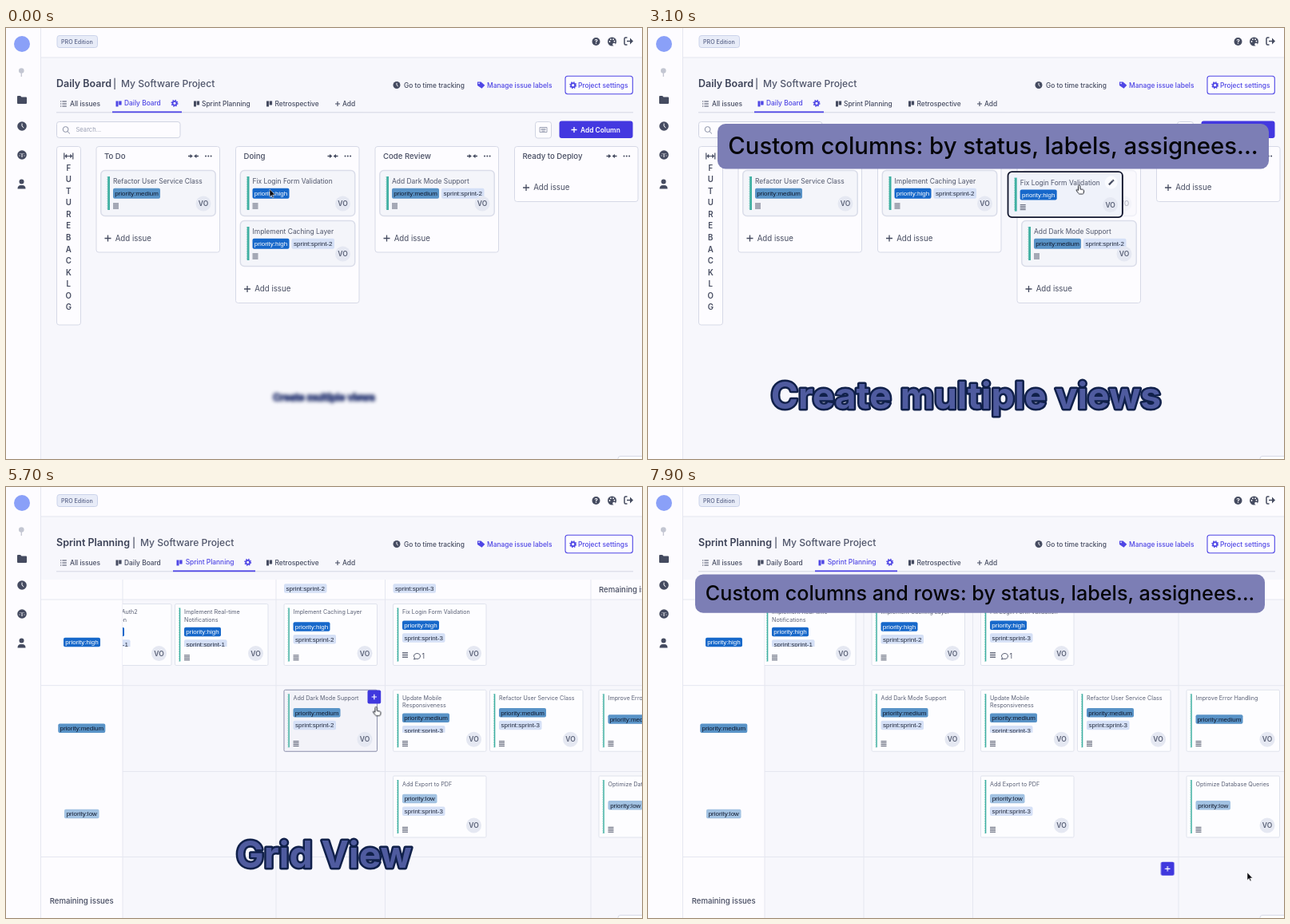
Recreate the animation shown at these times as an HTML page. Size 796 px wide and 540 px high, loop 8 s.

```html
<!DOCTYPE html>
<html lang="en">
<head>
<meta charset="utf-8">
<title>Project board</title>
<style>
html, body { margin: 0; width: 100%; height: 100%; overflow: hidden; background: #f7f7fc; }
svg { font-family: Inter, sans-serif; font-optical-sizing: none; }
#stage { display: block; width: 796px; height: 540px; }
.tag { font-family: "Liberation Sans", Arial, sans-serif; }
.ico { fill: none; stroke: #454b60; }
.step { animation: 8s step-end infinite; }
.move { animation: 8s linear infinite; }

.board { animation-name: board; }
.grid-page { animation-name: grid-page; }
.before { animation-name: before; }
.after { animation-name: after; }
.lifted { animation-name: lifted; }
.landing { animation-name: landing; }
.hovered { animation-name: hovered; }
.hand { animation-name: hand; }
.arrow { animation-name: arrow; }
.cell-hover { animation-name: cell-hover; }
.last-plus { animation-name: last-plus; }
.drag { animation-name: drag; }
.cursor { animation-name: cursor; }
.scroll { animation-name: scroll; animation-timing-function: ease-in-out; }
.cap { transform-origin: 398px 463px; }
.cap1 { animation-name: cap1; }
.cap2 { animation-name: cap2; }
.ban1 { animation-name: ban1; }
.ban2 { animation-name: ban2; }

@keyframes board { 0% { opacity: 1 } 58.75%, 100% { opacity: 0 } }
@keyframes grid-page { 0% { opacity: 0 } 58.75%, 100% { opacity: 1 } }
@keyframes before { 0% { opacity: 1 } 36.25%, 100% { opacity: 0 } }
@keyframes after { 0% { opacity: 0 } 36.25%, 100% { opacity: 1 } }
@keyframes lifted { 0% { opacity: 1 } 25%, 100% { opacity: .4 } }
@keyframes landing { 0% { opacity: .4 } 41.25%, 100% { opacity: 1 } }
@keyframes hovered { 0% { opacity: 0 } 3.5% { opacity: 1 } 51%, 100% { opacity: 0 } }
@keyframes hand { 0% { opacity: 0 } 3.1% { opacity: 1 } 73.75%, 100% { opacity: 0 } }
@keyframes arrow { 0% { opacity: 1 } 3.1% { opacity: 0 } 73.75%, 100% { opacity: 1 } }
@keyframes cell-hover { 0% { opacity: 0 } 67.5% { opacity: 1 } 73.75%, 100% { opacity: 0 } }
@keyframes last-plus { 0% { opacity: 0 } 86.25%, 100% { opacity: 1 } }
@keyframes drag {
  0%, 25% { transform: translate(293px, 178px) }
  30% { transform: translate(318.5px, 170px) }
  36% { transform: translate(430px, 178px) }
  41.2% { transform: translate(468px, 181px) }
  41.25%, 100% { transform: translate(467.5px, 178px) }
}
@keyframes cursor {
  0% { transform: translate(333px, 207px) }
  17.5% { transform: translate(372px, 205px) }
  25% { transform: translate(384px, 201px) }
  30% { transform: translate(410px, 193px) }
  36% { transform: translate(521px, 201px) }
  41.25% { transform: translate(559px, 204px) }
  48.75% { transform: translate(491px, 233px) }
  56.25%, 62.5% { transform: translate(270px, 95px) }
  71.25% { transform: translate(464px, 281px) }
  80%, 100% { transform: translate(753px, 488px) }
}
@keyframes scroll {
  0%, 63% { transform: translate(0, 0) }
  71.25% { transform: translate(-65.5px, 0) }
  85%, 87% { transform: translate(-8px, 0) }
  98.75%, 100% { transform: translate(-133.5px, 0) }
}
@keyframes cap1 {
  0% { transform: scale(.26); filter: blur(9px); opacity: 1; animation-timing-function: ease-out }
  9%, 39% { transform: scale(1); filter: blur(0); opacity: 1; animation-timing-function: ease-in }
  45%, 100% { transform: scale(.2); filter: blur(10px); opacity: 0 }
}
@keyframes cap2 {
  0%, 60.5% { transform: scale(.2); filter: blur(10px); opacity: 0; animation-timing-function: ease-out }
  69.5%, 90.5% { transform: scale(1); filter: blur(0); opacity: 1; animation-timing-function: ease-in }
  96.5%, 100% { transform: scale(.2); filter: blur(10px); opacity: 0 }
}
@keyframes ban1 { 0%, 23.75% { opacity: 0 } 27.5%, 55% { opacity: 1 } 57.5%, 100% { opacity: 0 } }
@keyframes ban2 { 0%, 77.5% { opacity: 0 } 81.25%, 100% { opacity: 1 } }
</style>
</head>
<body>
<svg id="stage" viewBox="0 0 796 540"></svg>
<script>
const INK = '#454b60', BLUE = '#4f46e5', PAPER = '#fdfcff', BACK = '#f7f7fc', EDGE = '#d6d9e6', RULE = '#e5e7f0';

const text = (x, y, size, str, fill = INK, weight = 400, extra = '') =>
  `<text x="${x}" y="${y}" font-size="${size}" fill="${fill}" font-weight="${weight}" ${extra}>${str}</text>`;
const mid = 'text-anchor="middle"';
const box = (x, y, w, h, r, fill, stroke = 'none', sw = 1) =>
  `<rect x="${x}" y="${y}" width="${w}" height="${h}" rx="${r}" fill="${fill}" stroke="${stroke}" stroke-width="${sw}"/>`;
const dot = (x, y, r, fill) => `<circle cx="${x}" cy="${y}" r="${r}" fill="${fill}"/>`;
const at = (x, y, body) => `<g transform="translate(${x} ${y})">${body}</g>`;
const group = (cls, body) => `<g class="${cls}">${body}</g>`;
const line = (x, y, d, sw = 1, color = INK, extra = '') =>
  at(x, y, `<path d="${d}" class="ico" style="stroke:${color}" stroke-width="${sw}" ${extra}/>`);
const solid = (x, y, d, fill = INK) => at(x, y, `<path d="${d}" fill="${fill}"/>`);

// Icons
const plus = (x, y, r = 4, color = INK, sw = 1.3) => line(x, y, `M${-r} 0h${2 * r}M0 ${-r}v${2 * r}`, sw, color);
const notes = (x, y) => line(x, y, 'M-3.5-3h7M-3.5-1h7M-3.5 1h7M-3.5 3h7', .9);
const bars = (x, y, color) => solid(x, y, 'M-3.5-3.5h3v7h-2.4q-.6 0-.6-.6zM.2-3.5h3.4v4.4q0 .6-.6.6H.2z', color);
const gear = (x, y) => at(x, y, `<circle r="2.5" fill="none" stroke="${BLUE}" stroke-width="1.8"/>
  <circle r="3.8" fill="none" stroke="${BLUE}" stroke-width="1.4" stroke-dasharray="1.5 1.485"/>`);
const clock = (x, y, r) => dot(x, y, r, INK) + line(x, y, `M0 ${-r * .6}V0l${r * .4} ${r * .35}`, 1, PAPER);
const collapse = (x, y) => line(x, y, 'M-6.5 0h4M6.5 0h-4', 1.3) + solid(x, y, 'M-4-2.6l3.4 2.6-3.4 2.6zM4-2.6L.6 0 4 2.6z');
const dots = (x, y) => [-3.3, 0, 3.3].map(d => dot(x + d, y, 1, INK)).join('');
const avatar = (x, y) => dot(x, y, 9.5, '#e5e8f2') + text(x, y + 3.1, 8.5, 'VO', '#5a6177', 600, mid);

const TAGS = {
  high: ['priority:high', 46, '#1768ca', '#fff'],
  medium: ['priority:medium', 59, '#5993c7', '#10182c'],
  low: ['priority:low', 43.5, '#a2c2e2', '#10182c'],
  s1: ['sprint:sprint-1', 53.5, '#d5e0f6', '#20283c'],
  s2: ['sprint:sprint-2', 53.5, '#d5e0f6', '#20283c'],
  s3: ['sprint:sprint-3', 53.5, '#d5e0f6', '#20283c'],
};
function tag(x, cy, key, h = 11.5) {
  const [name, w, bg, fg] = TAGS[key];
  return box(x, cy - h / 2, w, h, 2, bg) + text(x + w / 2, cy + 2.8, 8, name, fg, 400, `class="tag" ${mid}`);
}
const stripe = (x, y, w, h) =>
  box(x, y, w, h, 0, '#3fb0a2') + line(x - .3, y, `M0 0v${h}`, .8, '#8fd0c6', 'stroke-dasharray="1.5 1.5"');

function chrome() {
  const side = box(0, 0, 43.5, 540, 0, PAPER) + box(43.5, 0, 753, 36.5, 0, PAPER) +
    line(43.5, 0, 'M0 0V540M0 37H753', 1, RULE) +
    dot(20, 20, 10, '#8aa0f8') +
    dot(19.3, 53.5, 3.3, '#c3c6d2') + line(19.3, 55, 'M0 0v6', 1.3, '#c3c6d2') +
    solid(20, 90, 'M-6-4q0-1 1-1h3l1.5 1.5H5q1 0 1 1V4q0 1-1 1H-5q-1 0-1-1z') +
    clock(20, 123, 5.8) +
    dot(20, 159, 5.8, INK) + line(20, 160, 'M0 2V-3M-3.5 0h1M2.5 0h1M-2.6-3l.8.8M2.6-3l-.8.8', 1, PAPER) +
    dot(19.5, 192.5, 3, INK) + solid(19.5, 196, 'M-5 5.5q0-4.5 4-4.5h2q4 0 4 4.5z');
  const top = box(64, 9.5, 50.5, 15, 3, '#e8ecf8', '#cbd3ea') + text(69, 19.7, 7.1, 'PRO Edition', '#5a6488', 500) +
    dot(738.5, 17, 5, INK) + text(738.5, 19.8, 7.6, '?', PAPER, 700, mid) +
    dot(758.5, 17, 5.5, INK) + [[-3, 0], [-1.6, -2.8], [1.6, -2.8], [3, -.3]].map(([x, y]) => dot(758.5 + x, 17 + y, .9, PAPER)).join('') +
    dot(761, 20.5, 1.8, PAPER) +
    line(779, 16.5, 'M-1.5-4.5h-2q-1.5 0-1.5 1.5v6q0 1.5 1.5 1.5h2M-2 0h6', 1.5) + solid(779, 16.5, 'M2-4l4 4-4 4z');
  return side + top + box(766, 536.5, 40, 10, 3, '#fff', EDGE);
}

function header(title, barX, nameX, sprint) {
  const link = (x, y, str, on) => text(x, y, 8.4, str, on ? BLUE : INK, 500);
  const [u0, u1] = sprint ? [209, 312] : [133, 220];
  return text(63, 74.4, 12.5, title, '#3c4257', 600) + text(barX, 74, 12, '|', INK, 500) +
    text(nameX, 74.4, 12.1, 'My Software Project', '#50566b', 500) +
    clock(489, 71.5, 4.5) + link(498, 74.6, 'Go to time tracking') +
    solid(595, 71.5, 'M-5-4h4.5l4.8 4.2-3.8 4L-5 .5z', BLUE) + dot(592, 69.3, .9, BACK) + link(602, 74.6, 'Manage issue labels', 1) +
    box(700, 60.3, 84.3, 22.5, 3, PAPER, BLUE, 1.1) + gear(709.7, 71.7) + link(716, 74.6, 'Project settings', 1) +
    line(63, 105.8, 'M0 0h722', 1, '#d3d6e3') + box(u0, 104.4, u1 - u0, 1.8, 0, BLUE) +
    line(72, 95, 'M-4-3h1.2M-4 0h1.2M-4 3h1.2M-1.6-3h5.4M-1.6 0h5.4M-1.6 3h5.4', 1.1) + link(80, 97.7, 'All issues') +
    bars(141, 95, sprint ? INK : BLUE) + link(148, sprint ? 97.7 : 97.2, 'Daily Board', !sprint) +
    gear(sprint ? 302.7 : 211, 94.3) +
    bars(sprint ? 217 : 238.5, 95, sprint ? BLUE : INK) + link(sprint ? 224.7 : 245, sprint ? 97.2 : 97.7, 'Sprint Planning', sprint) +
    bars(329.5, 95, INK) + link(336.5, 97.7, 'Retrospective') +
    plus(415, 95, 3, INK, 1.1) + link(421, 97.7, 'Add');
}

// Board page
const ISSUES = {
  refactor: ['Refactor User Service Class', 'medium'],
  login: ['Fix Login Form Validation', 'high'],
  cache: ['Implement Caching Layer', 'high', 's2'],
  dark: ['Add Dark Mode Support', 'medium', 's2'],
};
function card(key, hover) {
  const [title, ...tags] = ISSUES[key];
  let x = 15.5;
  const labels = tags.map(k => { const s = tag(x, 29.3, k, 13); x += TAGS[k][1] + 3; return s; }).join('');
  return box(.3, .5, 143.4, 57, 5, hover ? '#eff2fa' : '#f4f5fa', hover ? '#12162d' : '#dadde9', hover ? 1.9 : 1.5) +
    stripe(8.7, 8, 2.8, 42) + text(15.5, 17.2, 8.45, title, '#50566b') + labels +
    notes(19, 45) + avatar(128.5, 42) +
    (hover ? dot(129.5, 14, 8, '#fafbff') + line(129.5, 14, 'M-2.8 2.8L2 -2', 2.2) + line(129.5, 14, 'M2.2-2.2l1-1', 2.2) : '');
}
const COL = [113, 287.5, 462, 636.5];
function column(i, name, keys, wrap = {}) {
  const x = COL[i], n = keys.length;
  return box(x, 148.5, 154.5, 69 + 63.5 * n, 3, PAPER, EDGE) +
    text(x + 10, 164, 9.6, name, INK, 500) + collapse(x + 121.5, 160.5) + dots(x + 140.3, 160.5) +
    keys.map((k, j) => at(x + 5.5, 178 + 63 * j, wrap[k] ? group('step ' + wrap[k], card(k)) : card(k))).join('') +
    plus(x + 14.5, 200 + 63.5 * n) + text(x + 23.7, 203.3 + 63.5 * n, 9.68, 'Add issue');
}
function board() {
  const tools = box(63.5, 117.5, 154.5, 20, 3, PAPER, '#d0d4e2') +
    line(75, 127, 'M3 0a3.4 3.4 0 1 0-6.8 0 3.4 3.4 0 1 0 6.8 0M2 2.6L5 5.5', 1, '#8a90a5') + text(87.5, 129.8, 7.6, 'Search...', '#9aa0b4') +
    box(662.5, 117.5, 20, 20.5, 3, PAPER, '#d0d4e2') +
    line(672.5, 127.5, 'M-4.5-3h9v6h-9zM-3-1.2h6M-3 .2h6M-2 1.7h4', .8, '#8a90a5') +
    box(692.5, 116.5, 92, 21.5, 3, '#4338e0') + plus(711, 127.5, 3.5, '#fff') + text(719, 130.6, 8.4, 'Add Column', '#fff', 600);
  const backlog = box(63.5, 148.5, 30, 223.5, 3, PAPER, EDGE) +
    line(78.3, 160.5, 'M-5.5-4v8M5.5-4v8M-4 0h8M-2-2l-2 2 2 2M2-2l2 2-2 2', 1.2) +
    [...'FUTUREBACKLOG'].map((c, i) => text(78.3, 178.7 + 14.55 * i, 9.7, c, INK, 600, mid)).join('');
  return header('Daily Board', 134, 144, false) + tools + backlog +
    column(0, 'To Do', ['refactor']) + column(3, 'Ready to Deploy', []) +
    group('step before', column(1, 'Doing', ['login', 'cache'], { login: 'lifted' }) + column(2, 'Code Review', ['dark'])) +
    group('step after', column(1, 'Doing', ['cache']) + column(2, 'Code Review', ['login', 'dark'], { login: 'landing' })) +
    group('step hovered', group('move drag', card('login', true)));
}

// Grid page: [x, row, title lines, tags, comments]
const CELLS = [
  [156, 0, ['Implement OAuth2', 'Authentication'], ['high', 's1']],
  [277, 0, ['Implement Real-time', 'Notifications'], ['high', 's1']],
  [413.5, 0, ['Implement Caching Layer'], ['high', 's2']],
  [550, 0, ['Fix Login Form Validation'], ['high', 's3'], 1],
  [413.5, 1, ['Add Dark Mode Support'], ['medium', 's2']],
  [550, 1, ['Update Mobile', 'Responsiveness'], ['medium', 's3']],
  [671, 1, ['Refactor User Service Class'], ['medium', 's3']],
  [807.5, 1, ['Improve Error Handling'], ['medium']],
  [550, 2, ['Add Export to PDF'], ['low', 's3']],
  [807.5, 2, ['Optimize Database Queries'], ['low']],
];
const rowY = r => 146.5 + 107.75 * r;
function cell([x, row, title, tags, comments], hover) {
  const first = tags.length < 2 ? 36.8 : title.length > 1 ? 35 : comments ? 26.8 : 28.6;
  const labels = tags.map((k, i) => tag(11.5, first + 15.6 * i, k)).join('');
  return at(x, rowY(row),
    box(0, 0, 116.5, 77, 1.5, hover ? '#f3f3f9' : '#fdfdff', hover ? '#8f92ad' : '#dfe2ec') + stripe(5.3, 5, 1.5, 67) +
    title.map((s, i) => text(11.5, 12.6 + 9.6 * i, 7.15, s, '#5a6075')).join('') +
    `<svg width="116" height="53.5">${labels}</svg>` +
    notes(15, comments ? 64 : 67.3) + avatar(101, 62) +
    (comments ? line(30, 65.5, 'M4 0a4 3.3 0 1 0-7 2l-1 2 2.6-.8A4 3.3 0 0 0 4 0z', .9) + text(36, 68.7, 8.6, comments) : ''));
}
const plusButton = (x, y) => box(x, y, 16.7, 17, 2, '#4038de') + plus(x + 8.35, y + 8.5, 3.2, '#fff', 1.2);
function grid() {
  const sheet = line(0, 0, 'M403.5 116V540M540 116V540M797.5 116V540', 1, RULE) +
    tag(156, 127, 's1') + tag(413.5, 127, 's2') + tag(550, 127, 's3') +
    text(807.5, 132, 9.6, 'Remaining issues', INK, 500) +
    CELLS.map(c => cell(c)).join('') +
    group('step cell-hover', cell(CELLS[4], true) + plusButton(518, 254.5)) +
    group('step last-plus', plusButton(775.4, 469.8));
  return header('Sprint Planning', 158, 168, true) +
    box(44, 116, 752, 25, 0, PAPER) + box(44, 116, 102, 424, 0, PAPER) +
    line(44, 0, 'M0 141H752M0 248.7H752M102 356.5H752M0 463.5H752M102 116V540', 1, RULE) +
    `<clipPath id="view"><rect x="146" y="116" width="650" height="424"/></clipPath>` +
    `<g clip-path="url(#view)">${group('move scroll', sheet)}</g>` +
    tag(72, 194.5, 'high') + tag(65.3, 302.3, 'medium') + tag(73, 409.5, 'low') +
    text(94.7, 522.2, 9.6, 'Remaining issues', INK, 500, mid);
}

const caption = (cls, str) => group('move cap ' + cls, text(398, 476.8, 46.3, str, '#4f5b9f', 700,
  `${mid} stroke="#10204a" stroke-width="5" stroke-linejoin="round" paint-order="stroke"`));
const banner = (cls, x, y, w, h, base, size, str) =>
  group('move ' + cls, box(x, y, w, h, 10, '#7c7eb5') + text(x + w / 2, base, size, str, '#050508', 500, mid));
const pointer = group('move cursor',
  group('step arrow', `<path d="M-3-5v9.5l2.2-2 1.5 3.3 1.4-.6L.6 2h3z" fill="#0a0a10" stroke="#fff" stroke-width=".5"/>`) +
  group('step hand', `<path d="M-2.5-4.5a1.2 1.2 0 0 1 2.4 0v3.6l3.6.8q1.4.4 1.2 2l-.6 2.4q-.3 1-1.3 1h-3.6q-.8 0-1.4-.8l-2.8-3.7q-.2-1.2 1.2-.9l1.3 1z" fill="#fff" stroke="#23262f" stroke-width="1"/>`));

document.getElementById('stage').innerHTML =
  box(0, 0, 796, 540, 0, BACK) + chrome() +
  group('step board', board()) + group('step grid-page', grid()) + pointer +
  caption('cap1', 'Create multiple views') + caption('cap2', 'Grid View') +
  banner('ban1', 87, 120, 690, 56.5, 157.6, 29.3, 'Custom columns: by status, labels, assignees...') +
  banner('ban2', 59, 109.5, 713, 48.3, 141.6, 25.2, 'Custom columns and rows: by status, labels, assignees...');
</script>
</body>
</html>
```
